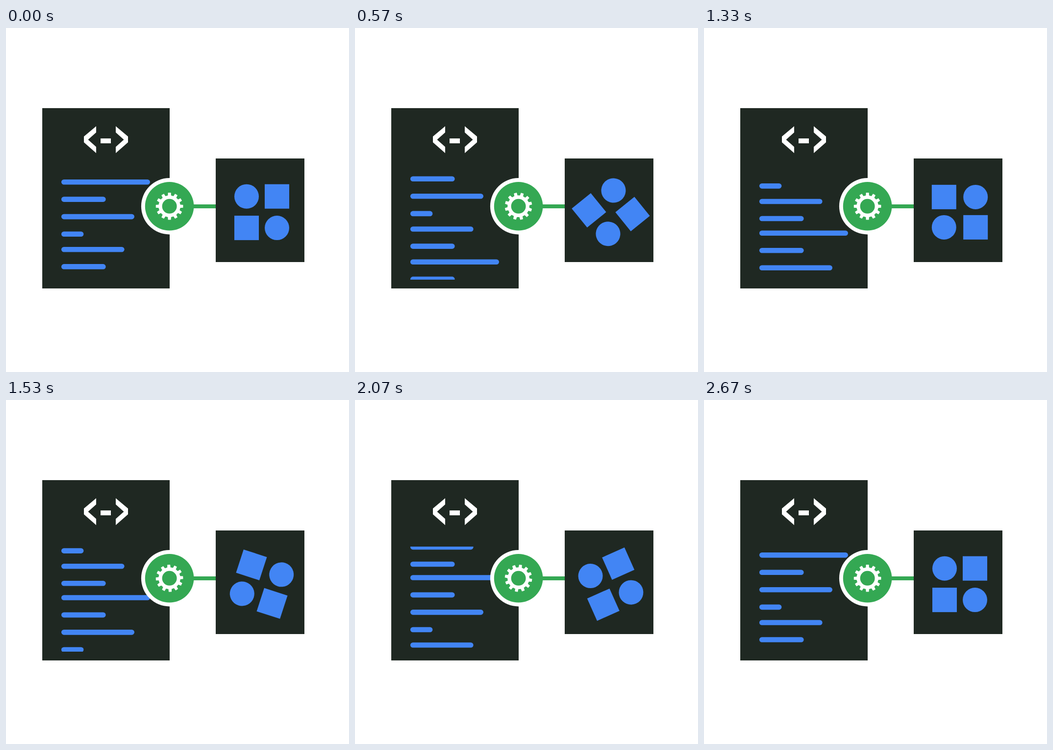
An HTML page for the animation above (2710 ms loop, 700 by 704 pixels).

```html
<!DOCTYPE html>
<html lang="en">
<head>
<meta charset="utf-8">
<title>Code builds components</title>
<style>
  html, body { margin: 0; width: 100%; height: 100%; overflow: hidden; background: #fff; }
  svg { display: block; width: 700px; height: 704px; }
  .panel { fill: #1f2822; }
  .blue { fill: #4285f4; }
  .green { fill: #34a853; }
  .white { fill: #fff; }
  .bar { stroke: #4285f4; stroke-width: 10.6; stroke-linecap: round; }
</style>
</head>
<body>
<svg viewBox="0 0 700 704">
  <clipPath id="window"><rect x="100" y="300" width="240" height="215"/></clipPath>

  <rect class="panel" x="74" y="164" width="260" height="369"/>
  <g class="white">
    <path id="chevron" d="M184 201L159 222V234L184 256V243.3L167.5 228.5L184 213.8Z"/>
    <use href="#chevron" transform="matrix(-1 0 0 1 408 0)"/>
    <rect x="193" y="226" width="21" height="10"/>
  </g>
  <g clip-path="url(#window)">
    <g id="bars"></g>
    <use id="nextBars" href="#bars"/>
  </g>

  <rect class="panel" x="428" y="267" width="181" height="212"/>
  <g id="shapes" class="blue">
    <circle cx="-31" cy="-32.2" r="25"/>
    <circle cx="31" cy="32.2" r="25"/>
    <rect x="6" y="-57.2" width="50" height="50"/>
    <rect x="-56" y="7.2" width="50" height="50"/>
  </g>

  <circle class="white" cx="333.6" cy="364.8" r="57.7"/>
  <rect class="green" x="375" y="361" width="53" height="8"/>
  <circle class="green" cx="333.6" cy="364.8" r="49.8"/>
  <g id="gear" class="white"><circle r="22.3"/></g>
  <circle class="green" cx="333.6" cy="364.8" r="15"/>
</svg>
<script>
  const LOOP = 2710;
  const byId = id => document.getElementById(id);
  const place = (id, transform) => byId(id).setAttribute('transform', transform);

  function add(parentId, name, attrs) {
    const el = document.createElementNS('http://www.w3.org/2000/svg', name);
    for (const key in attrs) el.setAttribute(key, attrs[key]);
    byId(parentId).append(el);
  }

  // Each bar: right end, vertical centre
  [[294, 315.2], [203.6, 350.6], [262, 386.1], [158.4, 421.7], [241.6, 453.3], [203.6, 488.4]]
    .forEach(([right, y]) => add('bars', 'line',
      { class: 'bar', x1: 118.2, x2: right - 5.3, y1: y, y2: y }));

  for (let i = 0; i < 12; i++) {
    add('gear', 'path', { d: 'M-3.5 -20L-2.9 -27.8H2.9L3.5 -20Z', transform: `rotate(${i * 30})` });
  }

  const clamp = (value, max) => Math.max(0, Math.min(max, value));

  function draw() {
    // 30 steps per second, each starting on a multiple of 10 ms
    const ticks = Math.floor(performance.now() % LOOP / 10);
    const step = Math.min(80, Math.floor((ticks * 3 + 1) / 10));

    const scroll = -2.459 * step;
    place('bars', `translate(0 ${scroll})`);
    // The copy moves with the first set, so only the difference is added
    place('nextBars', `translate(0 ${207.1 - 2.562 * step - scroll * 2 + scroll})`);

    const turn = 3 * (clamp(step, 30) + clamp(step - 40, 30));
    place('shapes', `translate(522 376.9) rotate(${turn})`);
    place('gear', `translate(333.6 364.8) rotate(${4.5 * step})`);
    requestAnimationFrame(draw);
  }
  draw();
</script>
</body>
</html>
```
